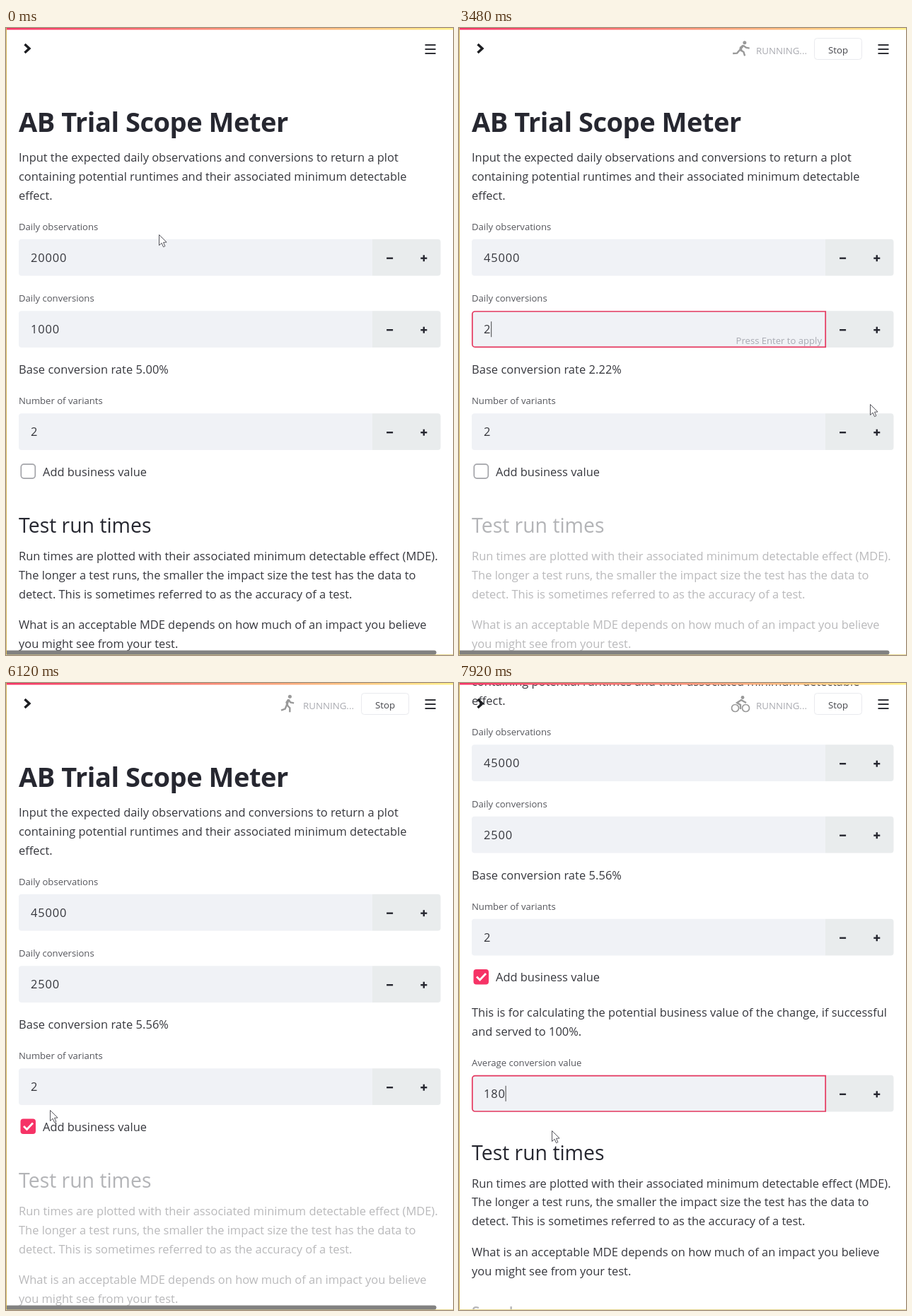
Animation of 632x887 px, one loop 8000 ms. Source, as an HTML page with a canvas:

```html
<!DOCTYPE html>
<html lang="en">
<head>
<meta charset="utf-8">
<title>Sample planner</title>
<style>
html, body { margin: 0; width: 632px; height: 887px; overflow: hidden; background: #fff; }
canvas { display: block; }
</style>
</head>
<body>
<canvas id="stage" width="632" height="887"></canvas>
<script>
const ctx = document.getElementById('stage').getContext('2d');
const LOOP = 8000, STEP = 120, KEY_TIME = 200, TAB_TIME = 240;
const INK = '#36373d', DARK = '#262730', PINK = '#f63366', GREY = '#999';
const FAMILY = '"Open Sans", "Noto Sans", sans-serif';
const LEADING = 26.75, DIGIT = 10.2, LEFT = 18;

const CHECKED = 5880, FORM_SHOWN = 6240, PLOT_SHOWN = 7200, FIRST_RUN = 2280;

// Each field is focused, typed into, then left by tabbing over its two buttons.
const observations = { old: '20000', next: '45000', focus: 480, type: 1200, tab: 2400 };
const conversions = { old: '1000', next: '2500', focus: 2880, type: 3480, tab: 4440 };
const variants = { old: '2' };
const average = { old: '180', focus: 7680, type: 7680 };

const ramp = (t, from, to) => Math.min(1, Math.max(0, (t - from) / (to - from)));
const between = (t, from, to = Infinity) => t >= from && t < to;

function text(str, x, y, { size = 16.43, weight = 400, color = INK, align = 'left', gap = 0 } = {}) {
  ctx.font = `${weight} ${size}px ${FAMILY}`;
  ctx.letterSpacing = gap + 'px';
  ctx.textAlign = align;
  ctx.fillStyle = color;
  ctx.fillText(str, x, y);
}

function paragraph(y, ...lines) {
  lines.forEach((line, i) => text(line, LEFT, y + i * LEADING));
}

function box(x, y, w, h, r, fill, stroke, line = 1) {
  ctx.beginPath();
  ctx.roundRect(x, y, w, h, r);
  if (fill) { ctx.fillStyle = fill; ctx.fill(); }
  if (stroke) { ctx.strokeStyle = stroke; ctx.lineWidth = line; ctx.stroke(); }
}

function path(color, width, ...points) {
  ctx.beginPath();
  for (const [x, y] of points) ctx.lineTo(x, y);
  ctx.strokeStyle = color;
  ctx.lineWidth = width;
  ctx.stroke();
}

function circle(x, y, r, width = 0) {
  ctx.beginPath();
  ctx.arc(x, y, r, 0, Math.PI * 2);
  ctx.lineWidth = width;
  if (width) ctx.stroke(); else ctx.fill();
}

function faded(alpha, draw) {
  ctx.save();
  ctx.globalAlpha = alpha;
  draw();
  ctx.restore();
}

function fieldValue(t, { old, next, type }) {
  return next && t >= type ? next.slice(0, 1 + Math.floor((t - type) / KEY_TIME)) : old;
}

function stepButton(x, y, focus, plus) {
  if (focus) faded(focus, () => box(x, y, 48, 52, plus ? [0, 4, 4, 0] : 0, PINK));
  const color = focus === 1 ? '#fff' : focus ? '#a08088' : DARK;
  const cx = x + 24.3, cy = y + 27;
  path(color, 2.4, [cx - 4.5, cy], [cx + 4.5, cy]);
  if (plus) path(color, 2.4, [cx, cy - 4.5], [cx, cy + 4.5]);
}

function numberField(t, label, y, field) {
  const { next, focus, type, tab } = field;
  const value = fieldValue(t, field);
  const end = 35 + value.length * DIGIT;
  const selected = between(t, focus, type);

  text(label, LEFT, y - 12.8, { size: 13.1, color: '#55565c' });
  box(LEFT, y, 500, 51.7, [4, 0, 0, 4], '#f0f2f6');
  box(518, y, 96.5, 51.7, [0, 4, 4, 0], '#e9eced');
  const plusAt = tab + TAB_TIME, leaveAt = plusAt + TAB_TIME;
  stepButton(518.3, y, +between(t, tab, plusAt), false);
  stepButton(566.5, y, between(t, leaveAt, leaveAt + STEP) ? .55 : +between(t, plusAt, leaveAt), true);

  if (selected) box(35, y + 15, end - 35, 22, 0, '#338ff5');
  text(value, 35, y + 32, { gap: .83, color: selected ? '#fff' : INK });
  if (between(t, focus, tab)) box(LEFT + .8, y + .8, 499.4, 50.4, [4, 0, 0, 4], null, '#e5385f', 1.7);
  if (between(t, type, tab)) {
    path('#444', 1, [end + .5, y + 15], [end + .5, y + 37]);
    if (next) text('Press Enter to apply', 513, y + 46.5, { size: 13.1, color: '#a9abb3', align: 'right' });
  }
}

function checkbox(label, y, checked) {
  if (checked) {
    box(20.5, y - 11, 21.5, 21.5, 4, PINK);
    path('#fff', 2.8, [25, y - .5], [29.5, y + 4], [38, y - 5]);
  } else {
    box(21.3, y - 10.4, 20, 20, 4, '#fff', '#a3a4a9', 1.7);
  }
  text(label, 52, y + 6);
}

function runSection(y) {
  text('Test run times', LEFT, y, { size: 28.4, color: DARK });
  paragraph(y + 39,
    'Run times are plotted with their associated minimum detectable effect (MDE).',
    'The longer a test runs, the smaller the impact size the test has the data to',
    'detect. This is sometimes referred to as the accuracy of a test.');
  paragraph(y + 136.4,
    'What is an acceptable MDE depends on how much of an impact you believe',
    'you might see from your test.');
}

function seeAlso(y) {
  text('See also', LEFT, y, { size: 20.8, weight: 600, color: DARK });
  text('AB test significance calculator', LEFT, y + 37, { color: '#2480c8', gap: .1 });
}

// A two-part limb; angles are measured from straight down, in radians.
function limb(x, y, length, upper, lower) {
  const kx = x + length * Math.sin(upper), ky = y + length * Math.cos(upper);
  path(GREY, 2.4, [x, y], [kx, ky], [kx + length * Math.sin(lower), ky + length * Math.cos(lower)]);
}

function athlete(lean, stride) {
  const hipX = 397, hipY = 31, neckX = hipX + 8 * Math.sin(lean), neckY = hipY - 8 * Math.cos(lean);
  circle(neckX + 2, neckY - 4, 2.5);
  path(GREY, 3, [hipX, hipY], [neckX, neckY]);
  for (const side of [-1, 1]) {
    limb(hipX, hipY, 6, side * stride + .2, side * stride - .6);
    limb(neckX, neckY, 5, -side * stride, .9 - side * .5);
  }
}

const icons = {
  run: () => athlete(.3, .6),
  skate: () => athlete(.65, .9),
  swim() {
    circle(405, 27, 2.7);
    path(GREY, 2.8, [399, 21], [392, 23], [402, 31]);
    for (const y of [34, 39]) {
      const wave = Array.from({ length: 23 }, (_, i) => [387 + i, y + 1.2 * Math.cos(i * .86)]);
      path(GREY, 2, ...wave);
    }
  },
  bike() {
    for (const side of [-1, 1]) circle(398 + side * 7.5, 35.5, 5, 1.7);
    circle(401, 20.5, 2.4);
    path(GREY, 2.3, [406, 28], [399, 24], [393, 28], [398, 31], [398, 37]);
  }
};
const ICON_ORDER = ['skate', 'swim', 'run', 'run', 'bike'], ICON_TIME = 1320;

function toolbar(t) {
  if (t >= FIRST_RUN) {
    box(377, 8, 200, 40, 0, 'rgba(255,255,255,.87)');
    ctx.fillStyle = ctx.strokeStyle = GREY;
    icons[ICON_ORDER[Math.floor((t - FIRST_RUN) / ICON_TIME)]]();
    text('RUNNING...', 420, 37, { size: 13.3, color: '#a9aab0' });
    box(502.5, 14.5, 67, 30, 4, '#fff', '#e9eaee');
    text('Stop', 536, 35.5, { size: 13.2, color: '#44454b', align: 'center' });
  }
  path('#1d1e22', 3.4, [26.5, 23], [33, 29], [26.5, 35]);
  for (let i = 0; i < 3; i++) box(592.5, 23 + i * 6, 15, 2, 0, '#303137');
}

const pointerStops = [
  { x: 216, y: 292, from: 0, to: 0 },
  { x: 84, y: 320, from: 0, to: 360 },
  { x: 581, y: 532, from: 600, to: 960 },
  { x: 62, y: 622, from: 4920, to: 5640 },
  { x: 62, y: 604, from: 5880, to: 6120 },
  { x: 168, y: 626, from: 6360, to: 6840 },
  { x: 118, y: 575, from: 7200, to: 7560 },
  { x: 131, y: 633, from: 7680, to: 7920 }
];
const arrow = new Path2D('M.5.5v15l3.6-3.3 2.4 5.5 2.4-1.1-2.4-5.3 4.6-.3z');

function pointer(t) {
  let { x, y } = pointerStops[0];
  for (const stop of pointerStops.slice(1)) {
    const p = ramp(t, stop.from, stop.to);
    x += (stop.x - x) * p;
    y += (stop.y - y) * p;
  }
  if (between(t, 240, 720) || between(t, 7560, 7800)) {
    path('#555', 1, [x, y - 8], [x, y + 8]);
    return;
  }
  ctx.save();
  ctx.translate(x, y);
  ctx.fillStyle = '#fff';
  ctx.fill(arrow);
  ctx.strokeStyle = '#55555c';
  ctx.lineWidth = 1;
  ctx.stroke(arrow);
  ctx.restore();
}

function page(t) {
  text('AB Trial Scope Meter', LEFT, 147, { size: 38, weight: 700, color: DARK, gap: -.45 });
  paragraph(189,
    'Input the expected daily observations and conversions to return a plot',
    'containing potential runtimes and their associated minimum detectable',
    'effect.');
  numberField(t, 'Daily observations', 298.7, observations);
  numberField(t, 'Daily conversions', 400.2, conversions);

  // The rate follows a field once its plus button has been reached.
  const applied = field => t >= field.tab + TAB_TIME ? field.next : field.old;
  const rate = (100 * applied(conversions) / applied(observations)).toFixed(2);
  text(`Base conversion rate ${rate}%`, LEFT, 489, { gap: .07 });
  numberField(t, 'Number of variants', 545.2, variants);
  checkbox('Add business value', 627.5, t >= CHECKED);

  if (t < FORM_SHOWN) {
    const stale = ramp(t, 3000, 3240) - ramp(t, 3600, 3840) + ramp(t, 5160, 5520);
    faded(1 - .65 * stale, () => runSection(714));
    return;
  }
  paragraph(683.5,
    'This is for calculating the potential business value of the change, if successful',
    'and served to 100%.');
  numberField(t, 'Average conversion value', 766.3, average);
  if (t >= PLOT_SHOWN) runSection(886);
  faded(.34, () => {
    if (t < PLOT_SHOWN) checkbox('Show table', 848.7, false);
    seeAlso(t < PLOT_SHOWN ? 922.5 : 1109);
  });
}

function frame(now) {
  const t = Math.floor((now % LOOP) / STEP) * STEP;
  box(0, 0, 632, 887, 0, '#fff');
  ctx.save();
  ctx.translate(0, -106.6 * ramp(t, 6720, 6960) - 104.9 * ramp(t, 7320, 7680));
  page(t);
  ctx.restore();
  toolbar(t);

  const band = ctx.createLinearGradient(0, 0, 632, 0);
  band.addColorStop(0, PINK);
  band.addColorStop(1, '#fff08a');
  box(0, 0, 632, 2.4, 0, band);
  box(0, 0, 1, 887, 0, '#d6b95c');
  box(0, 886, 632, 1, 0, '#e6d794');
  if (t < FORM_SHOWN) box(1, 880.5, 607.5, 6, [0, 3, 3, 0], '#818181');
  pointer(t);
  requestAnimationFrame(frame);
}
requestAnimationFrame(frame);
</script>
</body>
</html>
```
